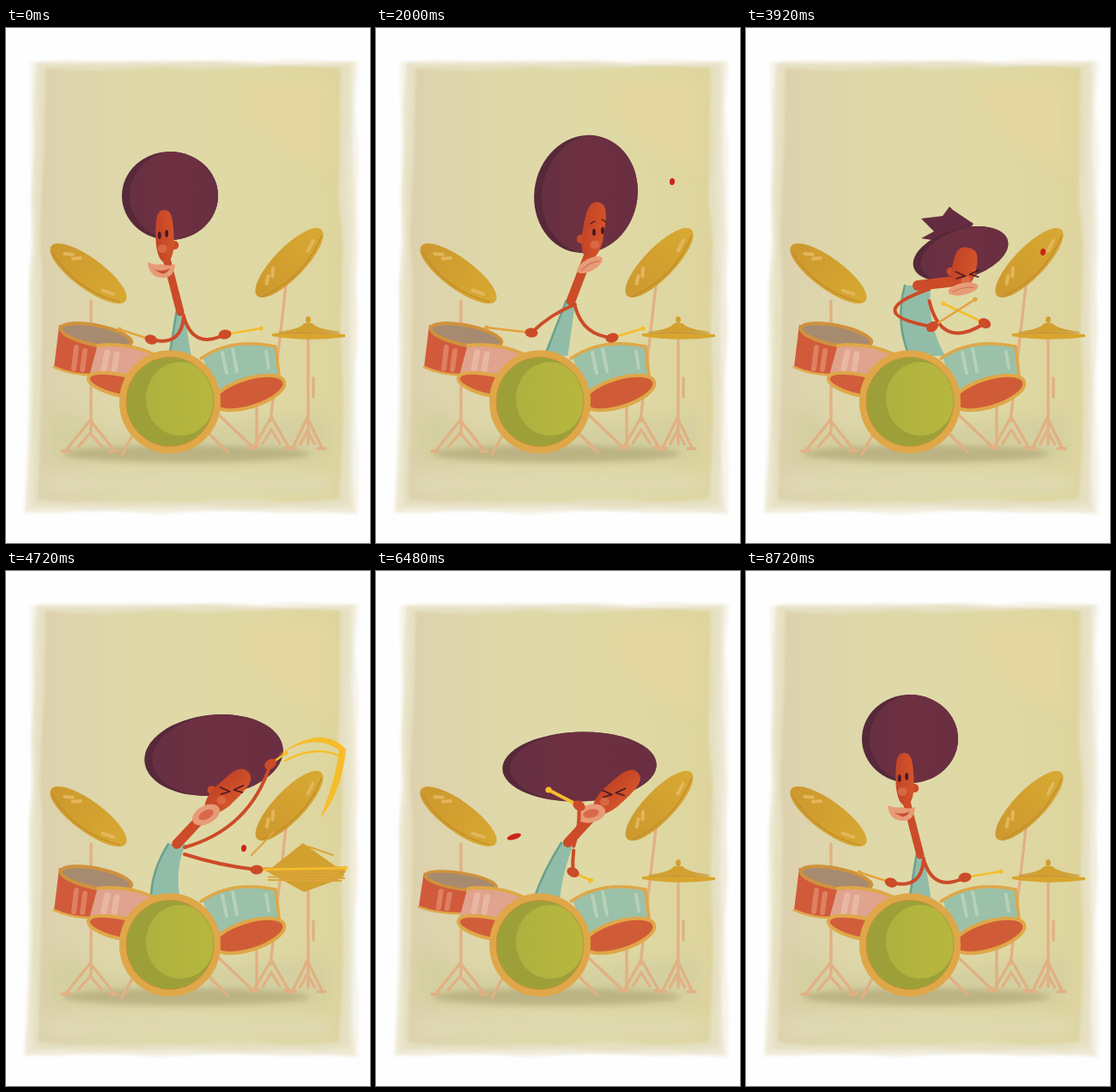
Animation, 424 px wide and 600 px high, one loop 8.8 s. Source, as an HTML page with a canvas:

```html
<!DOCTYPE html>
<html lang="en">
<head>
<meta charset="utf-8">
<title>Drummer and fly</title>
<style>
html, body { margin: 0; height: 100%; overflow: hidden; background: #fefefe }
canvas { display: block }
</style>
</head>
<body>
<canvas id="stage" width="424" height="600"></canvas>
<script>
const LOOP = 8800, STEP = 80, TAU = Math.PI * 2;
const SKIN = '#cc4b28', GOLD = '#dfa748', CYMBAL = '#d2a02f', STAND = '#e1b083', YELLOW = '#f6bd2b', LIPS = '#e79b76', INK = '#4b1824';
const stage = document.getElementById('stage').getContext('2d');
const back = document.createElement('canvas');
back.width = 424;
back.height = 600;
let c = back.getContext('2d');

// Helpers
const lerp = (a, b, k) => a + (b - a) * k;
const mix = (a, b, k) => a.map((v, i) => lerp(v, b[i], k));
function randomizer(seed) {
  return () => (seed = seed * 16807 % 2147483647) / 2147483647;
}
function fill(path, color) { c.fillStyle = color; c.fill(new Path2D(path)); }
function line(path, color, width) {
  c.strokeStyle = color;
  c.lineWidth = width;
  c.lineCap = c.lineJoin = 'round';
  c.stroke(new Path2D(path));
}
function oval(x, y, rx, ry, angle, color, rim, width = 4) {
  c.beginPath();
  c.ellipse(x, y, rx, ry, angle, 0, TAU);
  c.fillStyle = color;
  c.fill();
  if (rim) { c.strokeStyle = rim; c.lineWidth = width; c.stroke(); }
}
function place(x, y, draw, angle = 0, scaleY = 1) {
  c.save();
  c.translate(x, y);
  c.rotate(angle);
  c.scale(1, scaleY);
  draw();
  c.restore();
}
function gradient(x0, x1, ...colors) {
  const g = c.createLinearGradient(x0, 0, x1, 0);
  colors.forEach((color, i) => g.addColorStop(i / (colors.length - 1), color));
  return g;
}

// hair: x y rx ry angle; face: crown x y, chin x y, width, ear side; eyes: x y; mouth: x y angle;
// body: base x, top x y width, bow; arms: hand x y, bend; sticks: two tips
const calm = {
  hair: [191, 195.5, 56, 51.5, 0], face: [184, 212, 186, 273, 21, 1], eyes: [183, 240.5], mouth: [181, 282, 0],
  body: [203, 203, 331, 9, 0], left: [169, 363, .6], right: [255, 357, -.6], sticks: [132, 351, 297, 350],
  look: 'smile', strikes: ''
};
const wary = {
  hair: [244.5, 193.5, 60, 69, .2], face: [259, 203, 248, 269, 25, -1], eyes: [259, 237], mouth: [249, 276, -.5],
  body: [210, 227, 318, 11, 0], left: [181, 355, -.1], right: [275, 361, -.35], sticks: [129, 349, 311, 350],
  look: 'worry', strikes: ''
};
const tense = {
  hair: [250, 263, 57, 29, -.28], face: [259, 256, 250, 301, 28, -1], eyes: [258, 288], mouth: [253, 304, -.2],
  body: [211, 200, 300, 30, -14], left: [217, 348, -1.9], right: [278, 344, -.7], sticks: [267, 316, 230, 321],
  look: 'squint', strikes: ''
};
const crash = {
  hair: [242, 214.5, 81, 47, -.1], face: [282, 234, 234, 280, 27, -1], eyes: [263, 256], mouth: [233, 284, -.5],
  body: [186, 199, 318, 20, -10], left: [308, 225, -.27], right: [292, 348, -.05], sticks: [326, 212, 395, 346],
  look: 'shout', strikes: 'hat'
};
const roll = {
  hair: [283.5, 186, 90, 58, -.3], face: [321, 193, 234, 262, 47, 1], eyes: [247, 247], mouth: [246, 268, -.1],
  body: [227, 255, 302, 34, 0], left: [177, 327, .4], right: [188, 343, .05], sticks: [75, 369, 130, 375],
  look: 'squint', strikes: 'snare tom'
};
const sweep = {
  hair: [232, 241.5, 98.5, 34, .04], face: [328, 236, 276, 282, 25, 1], eyes: [291, 263], mouth: [268, 281, .05],
  body: [212, 248, 315, 10, 0], left: [165, 322, .08], right: [167, 354, -.05], sticks: [76, 298, 105, 375],
  look: 'squint', strikes: 'snare'
};
const fury = [roll, sweep, crash, sweep, roll, roll, crash, sweep, crash, roll, sweep, sweep];
const score = [
  [0, calm], [1760, calm], [2000, wary], [3200, wary], [3840, tense], [3920, tense],
  ...fury.map((pose, i) => [4080 + 320 * i, pose]), [8080, calm], [LOOP, calm]
];
const flight = [
  [1200, [362, 150]], [2000, [345, 179]], [2960, [340, 200]], [3440, [346, 261]],
  [3920, [346, 261]], [4720, [277, 323]], [5680, [299, 343]], [7040, [80, 290]]
];

function between(keys, t) {
  const i = keys.findIndex(key => key[0] > t);
  const [t0, a] = keys[i - 1], [t1, b] = keys[i], k = (t - t0) / (t1 - t0);
  return [a, b, k * k * (3 - 2 * k)];
}
function poseAt(t) {
  const [a, b, k] = between(score, t), near = k < .5 ? a : b;
  const pose = { look: near.look, bun: near === tense };
  for (const part in a) if (Array.isArray(a[part])) pose[part] = mix(a[part], b[part], k);
  pose.hit = drum => lerp(+a.strikes.includes(drum), +b.strikes.includes(drum), k);
  if (t < 1760) groove(pose, Math.sin(t / 880 * TAU), t < 960 ? 8 : 2);
  return pose;
}
function groove(pose, beat, height) {
  for (const part of ['hair', 'face', 'eyes', 'mouth']) {
    for (let i = 0; i < (part === 'face' ? 4 : 2); i += 2) {
      pose[part][i] += beat * 5;
      pose[part][i + 1] -= Math.abs(beat) * height;
    }
  }
  pose.left[1] -= beat * 5;
  pose.right[1] += beat * 5;
  pose.sticks[1] -= beat * 11;
  pose.sticks[3] += beat * 11;
}

// Scenery
function wash(inset, color, random) {
  const x0 = 26 + inset, x1 = 409 - inset * 1.25, y0 = 38 + inset * .6, y1 = 565 - inset;
  const rough = () => (random() - .5) * 5;
  c.beginPath();
  for (let i = 0; i < 40; i++) {
    const side = Math.floor(i / 10), k = i % 10 / 10;
    const x = [lerp(x0, x1, k), x1, lerp(x1, x0, k), x0][side];
    const y = [y0, lerp(y0, y1, k), y1, lerp(y1, y0, k)][side];
    c.lineTo(x + rough() + (x < 200 ? (300 - y) / 60 : 0), y + rough());
  }
  c.fillStyle = color;
  c.fill();
}
function tripod(x, y, spread) {
  const foot = y + 35;
  for (const s of [-1, 1]) {
    line(`M${x} ${y}L${x + s * spread} ${foot}m-5 1h9M${x} ${y + 15}L${x + s * spread / 2} ${foot - 4}`, STAND, 3.3);
  }
}
function backdrop() {
  const random = randomizer(7);
  c.fillStyle = '#fefefe';
  c.fillRect(0, 0, 424, 600);
  c.filter = 'blur(1.5px)';
  for (let i = 0; i < 5; i++) wash(i * 2.5, '#dfd6ae40', random);
  wash(15, gradient(40, 392, '#dcd1ad', '#ded7a9', '#dfd9a7', '#dfd8a3', '#ddd49d'), random);
  c.filter = 'blur(9px)';
  fill('M270 60H378V170L330 150L280 110Z', '#e4d69f');
  fill('M50 440L120 470L375 450V505H50Z', '#d4cfa0');
  fill('M45 522H380V540H45Z', '#dfdab5');
  c.filter = 'blur(3px)';
  oval(210, 496, 144, 10, 0, '#bcb384');
  c.filter = 'none';
  line('M99 318V470M326 300L308 458M292 430V487M352 360V485M358 408V430', STAND, 3.3);
  line('M153 464L135 497M232 468L258 494M247 450L287 488', STAND, 3.3);
  tripod(98, 457, 28);
  tripod(309, 453, 20);
  tripod(351, 454, 17);
}
function cymbal(x, y, angle) {
  place(x, y, () => {
    oval(0, 0, 53.8, 17.8, 0, gradient(-50, 50, '#cd992f', CYMBAL, '#d7a832'));
    line('M-49 5Q0 25 49 5', '#c28b2b', 1.3);
    line('M-28 -7l-8 5M-18 -9l-7 6M25 6l13 -4', '#e2b65b', 4);
  }, angle);
}
function hat(open) {
  if (open > .6) {
    const random = randomizer(11);
    fill('M304 350L346 317L384 344L398 345L391 358L347 374Z', CYMBAL);
    for (let i = 0; i < 5; i++) line(`M${300 + random() * 12} ${346 + i * 3.5}L${385 + random() * 20} ${349 + i * 3}`, '#dca538', 1.8);
    line('M286 331l26 -27M352 321l29 10', '#dca538', 2);
    return;
  }
  oval(352, 340, 3, 4, 0, CYMBAL);
  fill('M316 354Q343 351 347 344H357Q363 351 390 354Z', CYMBAL);
  fill('M310 356Q352 352 395 357V360Q352 366 310 359Z', '#d7a52f');
  line('M318 355H388', '#b98227', 1);
}
function snare(hit) {
  place(-12.5 * hit, 346 + 11 * hit, () => {
    fill('M62 0L56 49Q80 61 118 58L148 26Z', '#d15a3b');
    line('M82 26l-3 25M92 30l-3 22', '#de8061', 6);
    line('M56 49Q80 60 112 58', GOLD, 3);
    oval(105, 12, 42, 11.5, .2, '#a78b70', '#cf923d', 4);
  }, 0, 1 - .37 * hit);
}
function pinkTom(hit) {
  place(-9 * hit, 368 + 6 * hit, () => {
    fill('M107 0L97 37L150 57L172 10Q140 -1 107 0Z', '#dfa38e');
    line('M118 10l-4 19M129 12l-3 18', '#e8b7a1', 7);
    line('M107 2Q140 -2 172 12', GOLD, 4);
    oval(133, 48, 38, 12, .22, '#d15d3a', GOLD, 4);
  }, 0, 1 - .32 * hit);
}
function tealTom() {
  fill('M229 384Q262 363 313 371L319 404L245 425Z', '#9bc1a8');
  line('M252 378l5 24M264 374l5 26M303 377l3 19', '#b6d1b7', 4);
  line('M227 385Q262 360 314 371L318 404', GOLD, 3.5);
  oval(283, 425, 43, 16.5, -.3, '#d05c37', GOLD, 4);
}
function bass() {
  oval(191, 435.5, 55, 56, 0, '#9da039', GOLD, 8);
  oval(203, 432, 40, 43, 0, gradient(150, 248, '#acb03d', '#b7b83f'));
  oval(191, 435.5, 51, 52, 0, 'transparent', '#c7923a', 1);
}

// Player
function hair(p) {
  const [x, y, rx, ry, angle] = p.hair;
  if (p.bun) fill('M204 222L229 219L237 208L241 212L265 228L248 252L204 245L219 237Z', '#642c40');
  c.save();
  oval(x, y, rx, ry, angle, '#572839');
  c.clip();
  oval(x + 9, y, rx, ry + 1, angle, gradient(x - rx, x + rx, '#653044', '#6e3040', '#6a2e42'));
  c.restore();
}
function body(p) {
  const [base, x, y, w, bow] = p.body, foot = 9 + w * .4;
  const edge = s => `${base + s * foot} 382Q${(base + x + s * (foot + w / 2)) / 2 + bow} ${(382 + y) / 2} ${x + s * w / 2} ${y}`;
  fill(`M${edge(-1)}L${edge(1).split(' ').slice(-2)}L${base} 382Z`, '#91bda8');
  fill(`M${edge(-1)}L${x} ${y}L${base} 382ZM${edge(1)}L${x} ${y}L${base} 382Z`, '#91bda8');
  line(`M${edge(-1)}`, '#6ba18c', 2.5);
}
function head(p) {
  const [x0, y0, x1, y1, w, ear] = p.face, [, tx, ty] = p.body;
  const length = Math.hypot(x1 - x0, y1 - y0), [ex, ey] = p.eyes, [mx, my, tilt] = p.mouth;
  line(`M${lerp(x0, x1, .85)} ${lerp(y0, y1, .85)}L${tx} ${ty}`, SKIN, w * .43);
  // Local frame: the face runs from the crown down to the chin
  place(x0, y0, () => {
    oval(ear * w * .52, length * .68, 5, 5, 0, SKIN);
    fill(`M0 0C${w * .5} 0 ${w * .5} ${length * .25} ${w * .5} ${length * .65}Q${w * .4} ${length} 0 ${length}` +
      `Q${-w * .4} ${length} ${-w * .5} ${length * .65}C${-w * .5} ${length * .25} ${-w * .5} 0 0 0Z`,
      gradient(-w / 2, w / 2, '#c34427', '#d35429'));
  }, Math.atan2(x0 - x1, y1 - y0));
  oval(lerp(ex, mx, .4), lerp(ey, my, .4), 5.5, 5, 0, '#d96742');
  for (const s of [-1, 1]) place(ex + s * w * .2, ey - s, () => eye(p.look, s));
  place(mx, my, () => mouth(p.look, 7 + w * .38), tilt);
}
function eye(look, s) {
  if (look === 'smile' || look === 'worry') oval(0, 0, 1.9, 4.3, 0, INK);
  else line(`M${s * 8} -5L${-s * 3} 0L${s * 7} 3`, INK, 1.7);
  if (look === 'worry') line(`M${s * 4} -10l${-s * 5} -3`, INK, 1.4);
}
function mouth(look, r) {
  if (look === 'smile') {
    fill('M-16 -9Q-6 -5 0 -7Q9 -4 16 -7Q15 9 2 9Q-14 9 -16 -9Z', LIPS);
    fill('M-9 -1Q0 3 10 -2Q6 5 0 4Z', '#c44d35');
    return;
  }
  const shout = look === 'shout';
  oval(0, 0, r, shout ? 10.5 : 7, 0, LIPS);
  if (shout) oval(0, 0, r * .55, 5, 0, '#d9694a');
  else line(`M${-r * .7} 1Q0 -3 ${r * .7} 1`, '#cb7353', 1.2);
}
function arm(p, [hx, hy, bend], drop, tipX, tipY, width, color) {
  const [, x, y, w] = p.body, sx = x + w * .45, sy = y + drop;
  const elbowX = (sx + hx) / 2 + (hy - sy) * bend, elbowY = (sy + hy) / 2 - (hx - sx) * bend;
  line(`M${hx} ${hy}L${tipX} ${tipY}`, color, width);
  oval(tipX, tipY, width * .65 + 1, width * .65 + 1, 0, color);
  line(`M${sx} ${sy}Q${elbowX} ${elbowY} ${hx} ${hy}`, SKIN, 4);
  oval(hx, hy, 7.5, 5.5, Math.atan2(tipY - hy, tipX - hx), SKIN);
}
function fly(t) {
  if (t < 1200 || t >= 7040) return;
  const [a, b, k] = between(flight, t), [x, y] = mix(a, b, k);
  const resting = a[1] === b[1], dash = t > 5200;
  const buzz = resting ? 0 : 5 * Math.sin((t / STEP - 1) * TAU / 4);
  oval(x + buzz, y - buzz, dash ? 8.5 : 3, dash ? 3.2 : 4, dash ? -.3 : .1, '#cb2619');
}

function draw(now) {
  const t = Math.floor(now % LOOP / STEP) * STEP, p = poseAt(t);
  const onSnare = p.hit('snare'), onHat = p.hit('hat'), shake = Math.sin(t * .03) * .03;
  const [leftX, leftY, rightX, rightY] = p.sticks;
  c.drawImage(back, 0, 0);
  cymbal(96, 286, .637 + shake * onSnare);
  cymbal(330, 273.5, -.8 + shake * onHat);
  hat(onHat);
  hair(p);
  body(p);
  head(p);
  snare(onSnare);
  pinkTom(p.hit('tom'));
  tealTom();
  bass();
  arm(p, p.right, p.body[3] * .6, rightX, rightY, 2.5 + onSnare, onSnare > .5 ? '#e4a33b' : YELLOW);
  arm(p, p.left, 4, leftX, leftY, 2.5 + 3 * onSnare, onSnare + onHat > .5 ? YELLOW : '#e3a33d');
  if (onHat > .6) {
    fill('M316 216Q367 176 396 208Q391 258 366 288Q384 242 388 209Q359 187 316 216Z', YELLOW);
    line('M325 221Q362 202 389 216', YELLOW, 2.5);
  }
  fly(t);
}

backdrop();
c = stage;
const start = performance.now();
(function tick() {
  draw(performance.now() - start);
  requestAnimationFrame(tick);
})();
</script>
</body>
</html>
```
